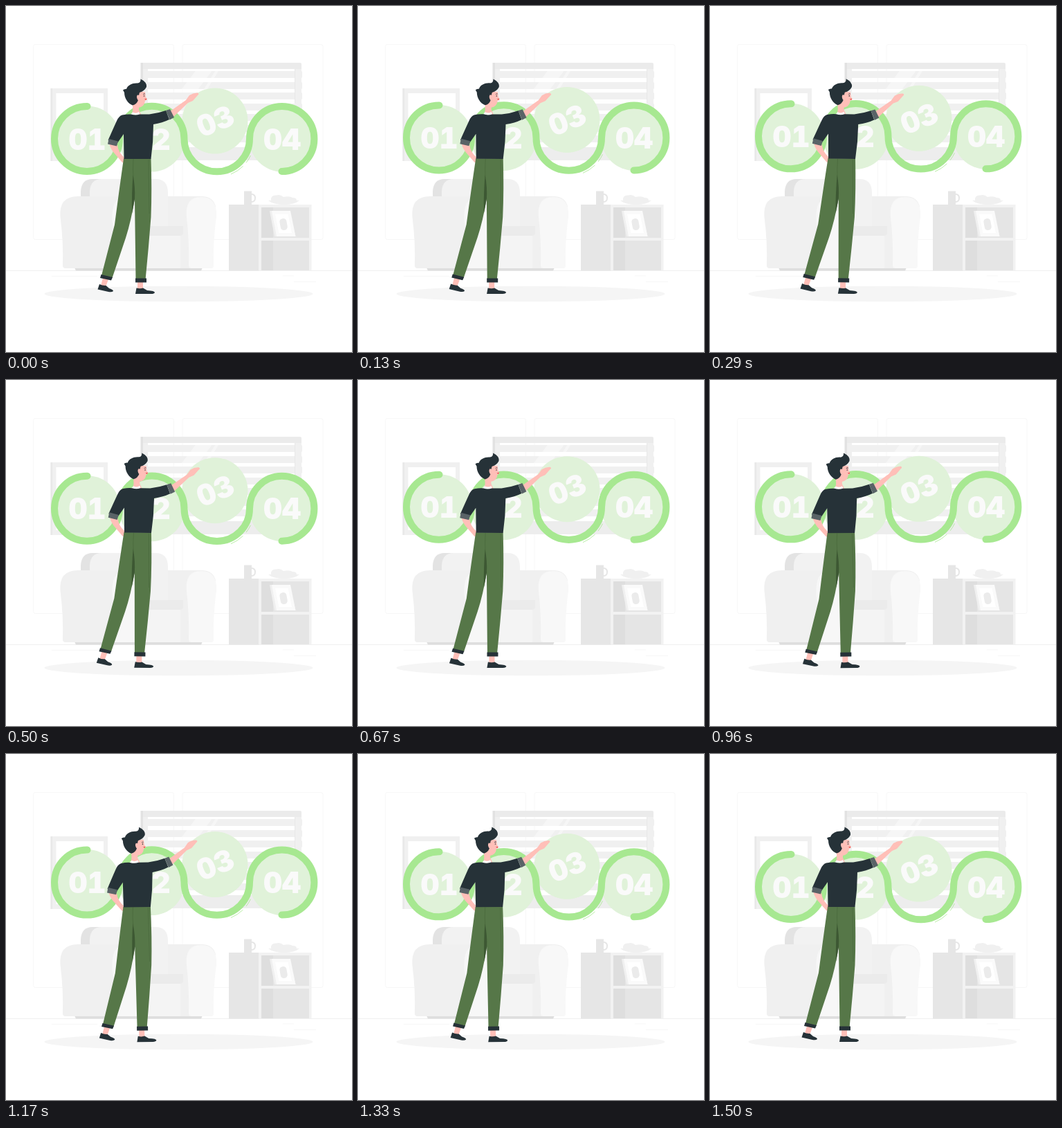
Animation, 500 px wide and 500 px high, one loop 1.54 s. Source, as an HTML page:

```html
<!DOCTYPE html>
<html lang="en">
<head>
<meta charset="utf-8">
<title>Four steps</title>
<style>
html, body { margin: 0; width: 100%; height: 100%; overflow: hidden; background: #fff; }
svg { display: block; width: 100vw; height: 100vh; }
text {
  font: 900 42px Inter, "Liberation Sans", sans-serif;
  font-variant-numeric: tabular-nums;
  text-anchor: middle;
  fill: #fafafa;
}
</style>
</head>
<body>
<svg viewBox="0 0 500 500">
  <!-- walls and floor -->
  <g fill="none" stroke="#f7f7f7">
    <rect x="39.5" y="55.5" width="203" height="282" rx="3"/>
    <rect x="255" y="55.5" width="203" height="282" rx="3"/>
    <path stroke="#efefef" d="M0 382.5H500"/>
    <path d="M66 390.5H132M400 390H416M416 398.5H448"/>
  </g>
  <ellipse cx="249.5" cy="416" rx="194" ry="11.3" fill="#f5f5f5"/>

  <!-- picture frame -->
  <path fill="#f0f0f0" d="M64.500 119H147V224H64.500z"/>
  <path fill="#e8e8e8" d="M64.500 119H67V224H64.500z"/>
  <path fill="#fff" d="M72.500 126H141V217H72.500z"/>

  <!-- window with blinds -->
  <g fill="#f0f0f0">
    <path d="M195 82H205V223H195zM417 91H427V223H417z"/>
    <g id="slats"></g>
    <path fill="#ebebeb" d="M195 82H425Q427 82 427 84V91H195z"/>
    <path fill="#e2e2e2" d="M194.500 82H198V223H194.500z"/>
    <path fill="#ededed" d="M198 204H427V223H198z"/>
    <path fill="#fff" opacity=".35" d="M250 125L276 91H300L274 125zM283 125L304 91H309L288 125z"/>
    <path fill="#e6e6e6" d="M417 91H417.800V140H417z"/>
  </g>

  <!-- sofa -->
  <path fill="#dedede" d="M99 378H284L282 382.500H101z"/>
  <path fill="#e3e3e3" d="M108 280V268Q109 250 125 250H160V300H108z"/>
  <path fill="#f2f2f2" d="M121 280V268Q122 250 138 250H216Q234 250 234 270V320H121z"/>
  <path fill="#f0f0f0" d="M82 375Q83 340 78.500 305Q76 275 104 275H170V379H86Q82 379 82 375z"/>
  <path fill="#f4f4f4" d="M165 318H256V379H165z"/>
  <path fill="#ebebeb" d="M190 318H256V328Q256 332 252 332H190z"/>
  <path fill="#f0f0f0" d="M234 275H284Q300 276 303 290L270 379H252V332Q256 332 256 328V318H234z"/>
  <path fill="#f8f8f8" d="M264 375Q265 340 261 305Q258 276 282 276Q306 276 304 305Q299 340 300 375Q300 379 296 379H268Q264 379 264 375z"/>
  <path fill="#f7f7f7" d="M157 379Q158 340 153.500 310Q152 276 172 276Q195 276 193 305Q188 340 189 379z"/>

  <!-- cabinet -->
  <path fill="#e6e6e6" d="M322 287H366V382.500H322z"/>
  <path fill="#f2f2f2" d="M365 287H441.500V382.500H365z"/>
  <path fill="#e5e5e5" d="M369 291H438V335H369zM369 339H438V382H369z"/>
  <path fill="#dedede" d="M369 291H386V335H369zM369 339H386V382H369z"/>
  <path fill="#f0f0f0" d="M381 296H410L418.500 333H388z"/>
  <path fill="#fafafa" d="M384 296H411L418.500 333H391z"/>
  <path fill="#fff" d="M389 301H407.500L413 328H394.500z"/>
  <rect x="396" y="307" width="10" height="17" rx="4.500" fill="#ebebeb" transform="rotate(-10 401 315)"/>
  <path fill="#e6e6e6" d="M344 267.500H355V287H344z"/>
  <path fill="none" stroke="#e6e6e6" stroke-width="2" d="M355 272Q360 272 360 277.500Q360 283 355 283"/>
  <path fill="#f0f0f0" d="M379 281H383Q382 273 391 273.500Q396 272 401 276Q410 274 414 277Q420 277 420 281H424Q417 287 402 287Q386 287 379 281z"/>

  <!-- ribbon and numbered discs -->
  <g id="steps">
    <g id="discs" fill="#e0f2d9"></g>
    <path fill="none" stroke="#a7e891" stroke-width="10" stroke-linecap="round"
      d="M117.500 145A47 47 0 1 0 164 192A46.500 47 0 0 1 257.500 192A47 47 0 0 0 352 192A46.700 47 0 1 1 398.500 239"/>
    <path fill="none" stroke="#a7e891" stroke-width=".8" d="M325 243A54.500 54.500 0 0 0 342.500 231.500M347 226.500A54.500 54.500 0 0 0 353.500 216"/>
    <g id="labels"></g>
  </g>

  <!-- man -->
  <g id="man">
    <g fill="#ffbfb8">
      <path d="M149 198Q150 204 155 211L168 226L171 227V219Q162 211 161 201z"/>
      <path d="M183 138L192 142V150Q194 154 195 157H181Q184 152 183 146z"/>
      <path d="M184 124H201L202 131L204 135L201 137Q200 146 191 147Q184 145 184 135z"/>
      <path d="M236 153L260 136L265 129Q271 125 277 125.500Q280 127 277 129L270 137L263 140L241 161z"/>
      <path d="M140 393L148 395L144 406L137 404zM190 398H198V410H190z"/>
    </g>
    <path fill="#fff" d="M180 157L183 153.500Q188 156 192 153L194 158z"/>
    <g fill="#263238">
      <path d="M183 143.500C176 141 171 133 171 125L169 121.500Q171 119.500 174 120C176 114 183 111 190 111.500Q195 111 194.500 105.500Q204 110 203 117Q200 123 193 125L192 129Q189 127 189 132Q190 136 191 136Q189 142 183 143.500z"/>
      <path d="M198 127.500Q199.500 126 201 126.800V127.500Q199.500 127 198 128z"/>
      <circle cx="199.500" cy="130" r=".8"/>
    </g>
    <path fill="#e8514c" d="M200 134.500L203.500 133.500L202.500 136z"/>

    <path fill="#567748" d="M170 220.500H209.500Q211 265 209.500 305Q206 350 201.500 396H187.500L186 278Q181 310 173 335L153.500 393L138 389.500L157 316Q163 270 170 220.500z"/>
    <path fill="#3d5833" d="M183.500 244Q187 262 186 279L182 300Q181.500 270 183.500 244z"/>
    <path fill="none" stroke="#466539" stroke-width=".6" d="M184 221Q183 236 184 250M206 222L207 300"/>

    <g fill="#263238">
      <path d="M168 157.500Q175 156 181 156.500Q187 158.500 193 156.500L207 156.500Q220 155 231 151L236 164Q226 169 213 171Q213 196 209.500 221H170.500L170 185L161 198L147.500 194Q155 177 160 166Q163 159 168 157.500z"/>
      <path d="M137.500 388L154 392L152 396.500L136 393zM187 393.500H203V399.500H187z"/>
      <path d="M135 402Q140 404.500 144.500 404L149 408Q155 410 155 412Q153 414 148 413L132.500 409.500z"/>
      <path d="M188.500 407.500Q194 409 198 407.500L204 411Q215 411.500 215 414Q214 416 210 416H187z"/>
    </g>
    <path fill="#596367" d="M148.500 192L162 195.500L160 202.500L147 199.500zM231 151L237 149L243 161L236.500 164.500z"/>
  </g>
</svg>
<script>
const $ = id => document.getElementById(id);
const rows = [94, 110, 125, 141, 156, 172, 187];
const steps = [[117.5, 192], [210.5, 192], [302, 166, -22], [399, 192]];

$('slats').innerHTML = rows.map(y =>
  `<rect x="198" y="${y}" width="230" height="10" rx="1.500"/>`).join('');
$('discs').innerHTML = steps.map(([x, y]) =>
  `<circle cx="${x}" cy="${y}" r="47.500"/>`).join('');
$('labels').innerHTML = steps.map(([x, y, turn = 0], i) =>
  `<text x="${x}" y="${y + 15.5}" transform="rotate(${turn} ${x} ${y})">0${i + 1}</text>`).join('');

const LOOP = 1540, SWING = 1500, STEP = SWING / 36, RISE = 9.4;

// Steady climb, then an accelerating fall.
const lift = p => -RISE * (p < .5 ? 2 * p : 1 - (2 * p - 1) ** 1.95);

// Linear sway between +1 and -1 degree.
const sway = p => p < .25 ? 4 * p : p < .75 ? 2 - 4 * p : 4 * p - 4;

function draw(now) {
  const t = now % LOOP;
  const p = Math.min(36, Math.floor((t + 5) / STEP)) * STEP / SWING;
  $('steps').setAttribute('transform', `translate(0 ${lift(p)})`);
  $('man').setAttribute('transform', `rotate(${sway(p)} 206 261)`);
}

const start = performance.now();
function tick() {
  draw(performance.now() - start);
  requestAnimationFrame(tick);
}
tick();
</script>
</body>
</html>
```
